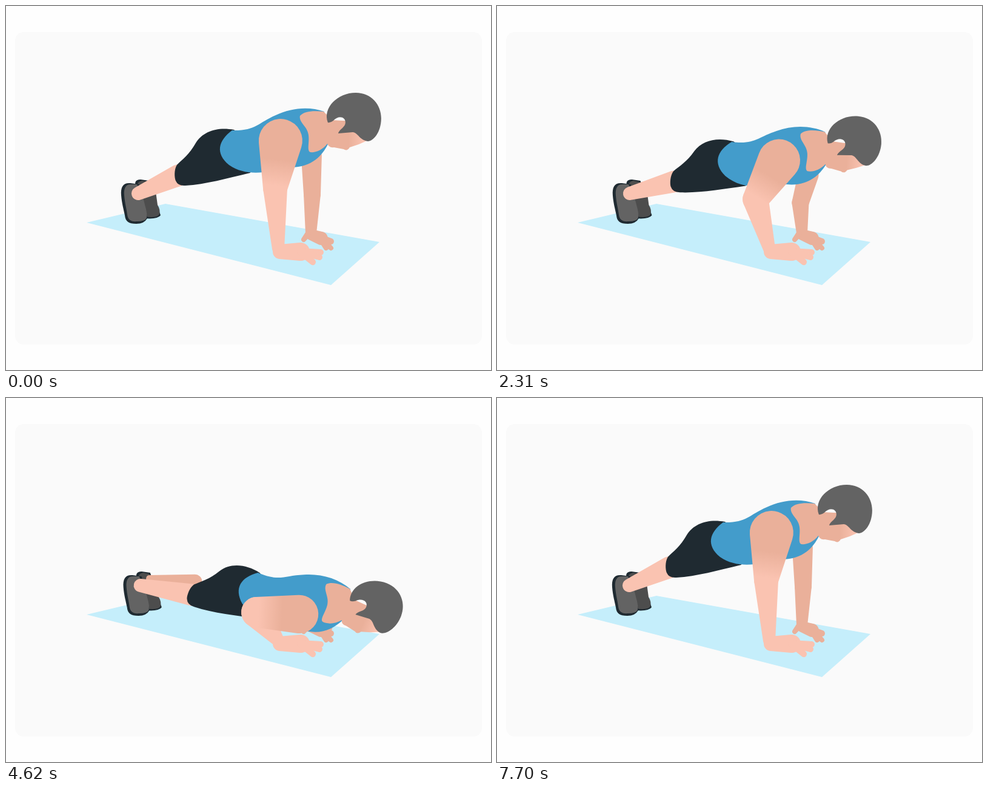
These frames come from a looping animation (800x600 px, 7770 ms). An HTML page with a canvas:

```html
<!DOCTYPE html>
<html lang="en">
<head>
<meta charset="utf-8">
<title>Push-up</title>
<style>
html, body { margin: 0; width: 100%; height: 100%; overflow: hidden; background: #fefefe; }
canvas { display: block; }
</style>
</head>
<body>
<canvas id="stage" width="800" height="600"></canvas>
<script>
const ctx = document.getElementById("stage").getContext("2d");
const STEP = 70, STEPS = 111, CYCLE = 28;
const DEPTH = 27.5; // degrees the body swings about the feet
const RAD = Math.PI / 180;
const LIGHT = "#fac3b1", SHADE = "#eab09a", DARK = "#1f2a31";

const mat = "M133 357L263 326L616 389L536 460Z";
const nearSole = "M205 292C193 291 189 298 190 312C191 325 194 335 196 345C197 355 202 359 215 359Q228 359 233 350L220 294Z";
const nearShoe = "M207 294C197 293 194 301 195 312C196 325 199 335 200 344C201 352 206 356 216 355Q230 355 232 349Q233 342 231 335L226 316L216 294Z";
const farSole = "M222 286C213 286 212 292 214 296L228 350Q250 352 255 345L236 288Z";
const farShoe = "M224 288Q216 290 217 296L229 347Q250 350 253 343Q255 336 250 328L247 306L234 290Z";

// Upper body, drawn in the highest position and moved as one piece
const shorts = "M376 204C350 199 325 206 313 226C303 244 291 253 282 262C277 270 278 283 280 288Q284 297 296 296C330 294 365 284 403 275L420 230Z";
const shirt = "M373 205C412 206 415 193 445 180C470 168 500 165 525 174L531 228C522 246 505 266 470 266L425 274C405 276 385 274 368 262C345 243 350 222 373 205Z";
const neck = "M485 181C492 173 508 172 524 174L545 195L531 226C522 238 510 242 502 241C496 238 501 225 499 212C497 198 483 192 485 181Z";
const face = "M536 188L530 226Q532 234 541 233L557 236Q563 240 567 233L582 228L598 221L575 190Z";
const hair = "M531 192C522 168 547 143 577 143C603 143 619 163 619 185C619 208 606 223 597 223C583 221 581 209 572 208L548 210C550 203 560 200 560 192C560 182 548 180 540 189Q535 193 531 192Z";

function shape(fill, d) {
  ctx.fillStyle = fill;
  ctx.fill(new Path2D(d));
}

function blend(from, to, start, end) {
  const g = ctx.createLinearGradient(from.x, from.y, to.x, to.y);
  g.addColorStop(start, SHADE);
  g.addColorStop(end, LIGHT);
  return g;
}

const joint = (x, y, r) => ({ x, y, r });

// Tapered limb: the hull of two circles
function limb(fill, a, b) {
  const angle = Math.atan2(b.y - a.y, b.x - a.x);
  const open = Math.acos((a.r - b.r) / Math.hypot(b.x - a.x, b.y - a.y));
  ctx.fillStyle = fill;
  ctx.beginPath();
  ctx.arc(a.x, a.y, a.r, angle + open, angle - open + 2 * Math.PI);
  ctx.arc(b.x, b.y, b.r, angle - open, angle + open);
  ctx.fill();
}

function hand(fill, wrist, palm, tips) {
  limb(fill, wrist, palm);
  for (const tip of tips) limb(fill, joint(palm.x, palm.y, 6), tip);
}

// Eased way down, quicker return with a firm stop at the top
function swing(phase) {
  const down = Math.min(1, Math.max(0, (phase - 2) / 9.5));
  const up = Math.min(1, Math.max(0, (26 - phase) / 14));
  return DEPTH * (phase < 12 ? down * down * (3 - 2 * down) : Math.sin(up * Math.PI / 2));
}

function draw(q) {
  const turn = (40 - q) * RAD;
  const body = new DOMMatrix()
    .translate(212 + 210 * Math.cos(turn), 340 - 210 * Math.sin(turn))
    .rotate(0.84 * q)
    .translate(-373, -205);
  const onBody = (x, y, r) => {
    const p = body.transformPoint({ x, y });
    return joint(p.x, p.y, r);
  };
  const knee = onBody(285, 279, 18);
  const shoulder = onBody(453, 222, 36 - 0.17 * q);
  shoulder.y += 0.9 * q;
  const elbow = joint(444 - 3.2 * q + 0.078 * q * q, 300 + 3.1 * q - 0.04 * q * q, 20 + 0.2 * q);
  const farElbow = joint(505 - 0.7 * q, 310 + 2.2 * q, 14);
  const shift = q / 7;

  ctx.resetTransform();
  ctx.clearRect(0, 0, 800, 600);
  ctx.fillStyle = "#fafafa";
  ctx.beginPath();
  ctx.roundRect(15, 43, 770, 515, 14);
  ctx.fill();
  shape("#c5eefb", mat);

  ctx.translate(shift / 2, 0);
  shape(DARK, farSole);
  shape("#4d4d4d", farShoe);
  ctx.resetTransform();
  limb(SHADE, joint(237, 298, 6), joint(knee.x + 5, knee.y - 0.85 * q, 12));
  limb(SHADE, onBody(504, 247, 17), farElbow);
  limb(SHADE, farElbow, joint(503, 374, 9));
  hand(SHADE, joint(503, 377, 9), joint(520, 383, 11),
    [joint(536, 388, 5), joint(536, 399, 4), joint(528, 399, 4)]);
  limb(SHADE, joint(498, 376, 5), joint(491, 385, 4));

  ctx.translate(shift, 0);
  shape(DARK, nearSole);
  shape("#636363", nearShoe);
  ctx.resetTransform();
  limb(LIGHT, joint(218 + shift, 309, 11), knee);

  ctx.setTransform(body);
  shape(DARK, shorts);
  shape("#439ccb", shirt);
  shape(SHADE, neck);
  shape(blend({ x: 565, y: 220 }, { x: 592, y: 220 }, 0, 1), face);
  shape("#636363", hair);
  ctx.resetTransform();

  limb(LIGHT, elbow, joint(449, 400, 10));
  limb(blend(shoulder, elbow, 0.4, 0.95), shoulder, elbow);
  hand(LIGHT, joint(452, 405, 12), joint(486, 405, 15),
    [joint(519, 406, 5), joint(517, 414, 5), joint(506, 422, 5)]);
}

const start = performance.now();
function loop() {
  const n = Math.floor((performance.now() - start) / STEP) % STEPS;
  // The first repetition runs one step ahead
  draw(swing((n < CYCLE ? n + 1 : n) % CYCLE));
  requestAnimationFrame(loop);
}
loop();
</script>
</body>
</html>
```
